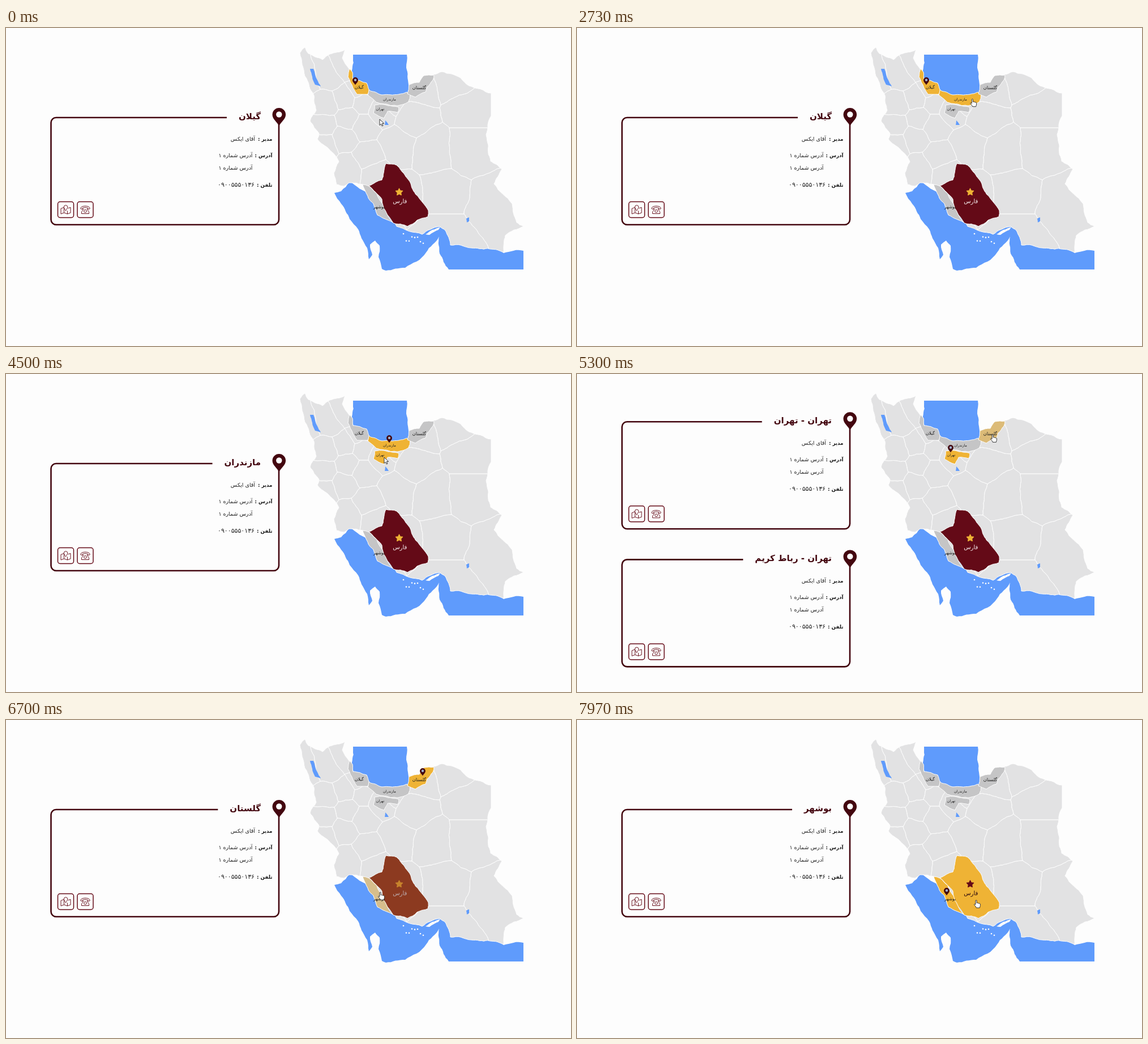
An HTML page with a canvas for the animation above (8000 ms loop, 998 by 561 pixels).

```html
<!DOCTYPE html>
<html lang="fa">
<head>
<meta charset="utf-8">
<title>Province map</title>
<style>
html, body { margin: 0; width: 100%; height: 100%; overflow: hidden; background: #fdfdfd; }
canvas { display: block; }
</style>
</head>
<body>
<canvas id="stage" width="998" height="561"></canvas>
<script>
const ctx = document.getElementById('stage').getContext('2d');
const LOOP = 8000, FADE = 300, WOBBLE = .14;
const PAPER = '#fdfdfd', WINE = '#43060f', BLUE = '#5f9bfc', LAND = '#e2e2e3';
const GREY = [197, 197, 198], GOLD = [239, 179, 53], RED = [100, 10, 23];
const FONT = '"DejaVu Sans", sans-serif';

const clamp = v => Math.max(0, Math.min(1, v));
const lerp = (a, b, k) => a.map((v, i) => v + (b[i] - v) * k);
const mix = (a, b, k) => `rgb(${lerp(a, b, k).map(Math.round).join(',')})`;
const within = ([a, b], t) => t >= a && t < b;
const noise = (...v) => {
  const s = Math.sin(v.reduce((sum, n, i) => sum + n * (12.9 + i * 21.7), 0)) * 4375.8;
  return s - Math.floor(s);
};

// Breaks an edge into a ragged line; horizontal and vertical edges stay straight
function ragged(a, b) {
  const length = Math.hypot(b[0] - a[0], b[1] - a[1]);
  if (length < 6 || a[0] === b[0] || a[1] === b[1]) return [b];
  const [p, q] = a[0] < b[0] ? [a, b] : [b, a];
  const k = (noise(...p, ...q) - .5) * WOBBLE;
  const mid = [(p[0] + q[0]) / 2 + (q[1] - p[1]) * k, (p[1] + q[1]) / 2 + (p[0] - q[0]) * k];
  return [...ragged(a, mid), ...ragged(mid, b)];
}

function region(points) {
  const line = points.flatMap((p, i) => ragged(p, points[(i + 1) % points.length]));
  return new Path2D('M' + line.join(' ') + 'Z');
}
const area = str => region(str.split(' ').map(pair => pair.split(',').map(Number)));

// Voronoi cell around one seat: cut a box by the bisector to every other seat
function cell(seat, _, seats) {
  let poly = [[500, 20], [930, 20], [930, 440], [500, 440]];
  for (const other of seats) {
    if (other === seat) continue;
    const side = p => Math.hypot(p[0] - seat[0], p[1] - seat[1]) ** 2 - Math.hypot(p[0] - other[0], p[1] - other[1]) ** 2;
    poly = poly.flatMap((p, i, all) => {
      const q = all[(i + 1) % all.length], a = side(p), b = side(q);
      const kept = a <= 0 ? [p] : [];
      if (a <= 0 !== b <= 0) kept.push(lerp(p, q, a / (a - b)));
      return kept;
    });
  }
  return region(poly.map(p => p.map(Math.round)));
}

const country = area('528,34 534,45 559,56 572,46 599,38 594,53 606,72 616,110 645,122 700,125 738,102 755,82 770,77 803,88 818,102 857,115 857,155 848,188 856,235 876,249 862,275 894,310 902,343 914,350 882,366 879,396 822,388 785,383 776,357 766,350 735,364 690,350 672,325 645,285 630,276 606,273 597,279 584,276 579,256 588,236 550,196 553,186 537,164 548,145 544,119 528,85 519,44');
const gulf = area('606,271 592,288 580,291 592,310 607,337 622,355 628,371 638,388 641,408 647,400 643,382 652,375 660,384 658,404 664,425 671,428 705,423 742,396 765,368 766,398 782,426 914,426 914,393 879,397 776,340 680,320');
const caspian = area('613,47 708,47 707,70 711,100 714,115 680,125 640,115 613,95 611,75');
const lakes = ['537,72 543,72 546,82 550,92 556,103 546,100 541,86', '669,171 670,163 676,171', '813,336 818,334 818,341 814,343'].map(area);
const island = area('741,364 767,351 764,356 748,365');

// on: span in which a province is lit; from: moment its card opens
const provinces = [
  { name: 'گیلان', label: [624, 107, 7.5], pin: [617, 92], from: 0, on: [-999, 2800],
    shape: area('607,72 612,78 613,91 637,97 642,110 639,117 620,117 613,106 604,86') },
  { name: 'مازندران', label: [677.5, 128, 6.3], pin: [677, 113], from: 2800, on: [1350, 4800],
    shape: area('641,109 664,118 694,117 708,113 714,118 711,130 692,137 668,134 654,131 639,118') },
  { name: 'تهران', label: [661, 145, 6.2], pin: [660, 130], from: 4800, on: [4150, 6100],
    cards: ['تهران - تهران', 'تهران - رباط کریم'],
    shape: area('651,136 668,135 682,138 694,140 692,149 674,147 668,159 649,150') },
  { name: 'گلستان', label: [730, 108, 8], pin: [736, 90], from: 6100, on: [5140, 7150],
    shape: area('712,100 730,96 738,84 756,83 754,92 744,104 741,113 723,122 709,116') },
  { name: 'بوشهر', label: [659, 318, 7.6], pin: [653, 301], from: 7150, on: [6580, 9999],
    shape: area('630,276 641,279 655,292 665,310 672,326 683,343 656,330 649,310 640,300') }
];
const fars = area('671,239 690,242 706,262 720,288 736,308 746,322 745,333 726,339 709,350 684,344 670,325 664,302 641,278 653,272 664,268 667,256');
const farsSpans = [[6200, 6487], [7600, 9999]];

const seats = '530,95 572,85 598,68 598,124 566,135 562,170 604,160 632,132 630,172 597,193 562,205 605,248 638,228 650,258 690,205 720,158 778,90 815,140 815,212 755,215 770,290 860,310 770,365 695,295'
  .split(' ').map(s => s.split(',').map(Number));
const cells = [...seats, ...provinces.map(p => p.label.slice(0, 2))].map(cell);

const stops = [
  [0, 660, 161], [1400, 700, 126], [3800, 697, 125], [4450, 668, 147], [4950, 667, 147],
  [5300, 734, 107], [6150, 736, 106], [6700, 661, 304], [7300, 661, 304], [7850, 705, 318], [LOOP, 705, 318]
];
const arrowSpans = [[0, 1380], [2900, 4600]];

const glow = (spans, t) => clamp(spans.reduce((s, [a, b]) => s + clamp((t - a) / FADE) - clamp((t - b) / FADE), 0));

function text(str, x, y, size, color, bold, align = 'right') {
  ctx.font = `${bold ? 'bold ' : ''}${size}px ${FONT}`;
  ctx.textAlign = align;
  ctx.fillStyle = color;
  ctx.fillText(str, x, y);
}

function stroke(shape, color, width) {
  ctx.strokeStyle = color;
  ctx.lineWidth = width;
  ctx.stroke(shape);
}

function fill(shape, color, edge) {
  ctx.fillStyle = color;
  ctx.fill(shape);
  if (edge) stroke(shape, PAPER, edge);
}

function dot(x, y, r, color) {
  ctx.beginPath();
  ctx.arc(x, y, r, 0, 7);
  ctx.fillStyle = color;
  ctx.fill();
}

function at(x, y, scale, draw) {
  ctx.save();
  ctx.translate(x, y);
  ctx.scale(scale, scale);
  draw();
  ctx.restore();
}

const pinShape = new Path2D('M0 20C-3 13-11.8 8-11.8-.2A11.8 11.8 0 0 1 11.8-.2C11.8 8 3 13 0 20Z');
function pin(x, y, scale, hole) {
  at(x, y, scale, () => {
    fill(pinShape, WINE);
    dot(0, -.5, 5.2, hole);
  });
}

function star(x, y, r, color) {
  const points = Array.from({ length: 10 }, (_, i) => {
    const a = i * Math.PI / 5 - Math.PI / 2, d = i % 2 ? r / 2 : r;
    return [x + d * Math.cos(a), y + d * Math.sin(a)];
  });
  const shape = new Path2D('M' + points.join(' ') + 'Z');
  fill(shape, color);
  stroke(shape, color, 1.4);
}

const mapIcon = new Path2D('M-3-4L-8.5-2V7.5L-3 5.5L3 7.5L8.5 5.5V-4L4-2.5M-3-4V5.5M3 2V7.5M0 2C-1-1-3.3-2-3.3-4.5A3.3 3.3 0 0 1 3.3-4.5C3.3-2 1-1 0 2Z');
const phoneIcon = new Path2D('M-8-1.5C-9.5-8 9.5-8 8-1.5L4.5-1V-3.2C2-4-2-4-4.5-3.2V-1ZM-3-1.5L-6.5 4V7H6.5V4L3-1.5M-2.4 2.5A2.4 2.4 0 0 1 2.4 2.5A2.4 2.4 0 0 1-2.4 2.5');
const buttonBox = new Path2D();
buttonBox.roundRect(-14, -14, 28, 28, 4);
function button(x, icon) {
  at(x, 320.5, 1, () => {
    stroke(buttonBox, '#640a17', 1.5);
    stroke(icon, '#640a17', .95);
  });
}

function card(title, dy) {
  at(0, dy, 1, () => {
    text(title, 450, 160.5, 15, WINE, true);
    const gap = 429 - ctx.measureText(title).width;
    stroke(new Path2D(`M${gap} 158H88.5A9 9 0 0 0 79.5 167V338A9 9 0 0 0 88.5 347H473A9 9 0 0 0 482 338V168`), WINE, 2.6);
    pin(482.3, 153, 1, PAPER);
    const rows = [
      ['مدیر :', 'آقای ایکس', 440, 199], ['آدرس :', 'آدرس شماره ۱', 435.5, 227.5],
      ['', 'آدرس شماره ۱', 435.5, 250], ['تلفن :', '۰۹۰۰۵۵۵۰۱۳۶', 439, 279.5, 11]
    ];
    for (const [label, value, x, y, size = 9.5] of rows) {
      text(label, 470.5, y, 8.7, '#161616', true);
      text(value, x, y, size, '#222');
    }
    button(105.5, mapIcon);
    button(140, phoneIcon);
  });
}

function drawMap(t, chosen) {
  fill(gulf, BLUE);
  fill(caspian, BLUE);
  fill(country, LAND, 1);
  ctx.save();
  ctx.clip(country);
  cells.forEach(c => stroke(c, PAPER, .8));
  ctx.restore();
  lakes.forEach(l => fill(l, BLUE));
  fill(island, PAPER);
  for (let i = 0; i < 8; i++) dot(702 + i * 5, 363 + i + noise(i) * 12, 1.3, PAPER);

  const k = glow(farsSpans, t);
  fill(fars, mix(RED, GOLD, k), 1);
  for (const p of provinces) fill(p.shape, mix(GREY, GOLD, glow([p.on], t)), 1);
  star(694.5, 289.5, 6.3, mix(GOLD, RED, k));
  text('فارس', 695.8, 309, 10.2, mix([245, 235, 236], [45, 12, 16], k), false, 'center');
  for (const p of provinces) text(p.name, ...p.label, '#1c1c1c', false, 'center');
  pin(...chosen.pin, .42, '#9fb0cf');
}

const arrow = new Path2D('M0 0V10.5L2.5 8.3L4.2 12L6 11.2L4.3 7.6L7.6 7.4Z');
const hand = new Path2D('M-1 1C-1-.6 1.2-.6 1.2 1V5C1.6 4.2 3.3 4.4 3.4 5.4C4 4.7 5.4 5 5.5 6C6.3 5.4 7.4 6 7.4 7V9.5C7.4 11 6.4 11.6 6.3 13.3H.3C.2 11.6-1.7 10.3-3.2 8C-4 6.7-2.4 6-1 7.8Z');
function cursor(t) {
  const i = stops.findIndex(s => s[0] > t);
  const [t0, ...start] = stops[i - 1], [t1, ...end] = stops[i];
  const u = (t - t0) / (t1 - t0);
  const [x, y] = lerp(start, end, u * u * (3 - 2 * u));
  const shape = arrowSpans.some(s => within(s, t)) ? arrow : hand;
  at(x, y, 1, () => {
    fill(shape, '#fff');
    stroke(shape, '#222', .9);
  });
}

function frame(now) {
  const t = now % LOOP;
  ctx.fillStyle = PAPER;
  ctx.fillRect(0, 0, 998, 561);
  ctx.direction = 'rtl';
  ctx.lineJoin = 'round';
  const chosen = provinces.findLast(p => p.from <= t);
  const titles = chosen.cards || [chosen.name];
  titles.forEach((title, i) => card(title, titles.length > 1 ? -73.7 + i * 243.1 : 0));
  drawMap(t, chosen);
  cursor(t);
  requestAnimationFrame(frame);
}
requestAnimationFrame(frame);
</script>
</body>
</html>
```
